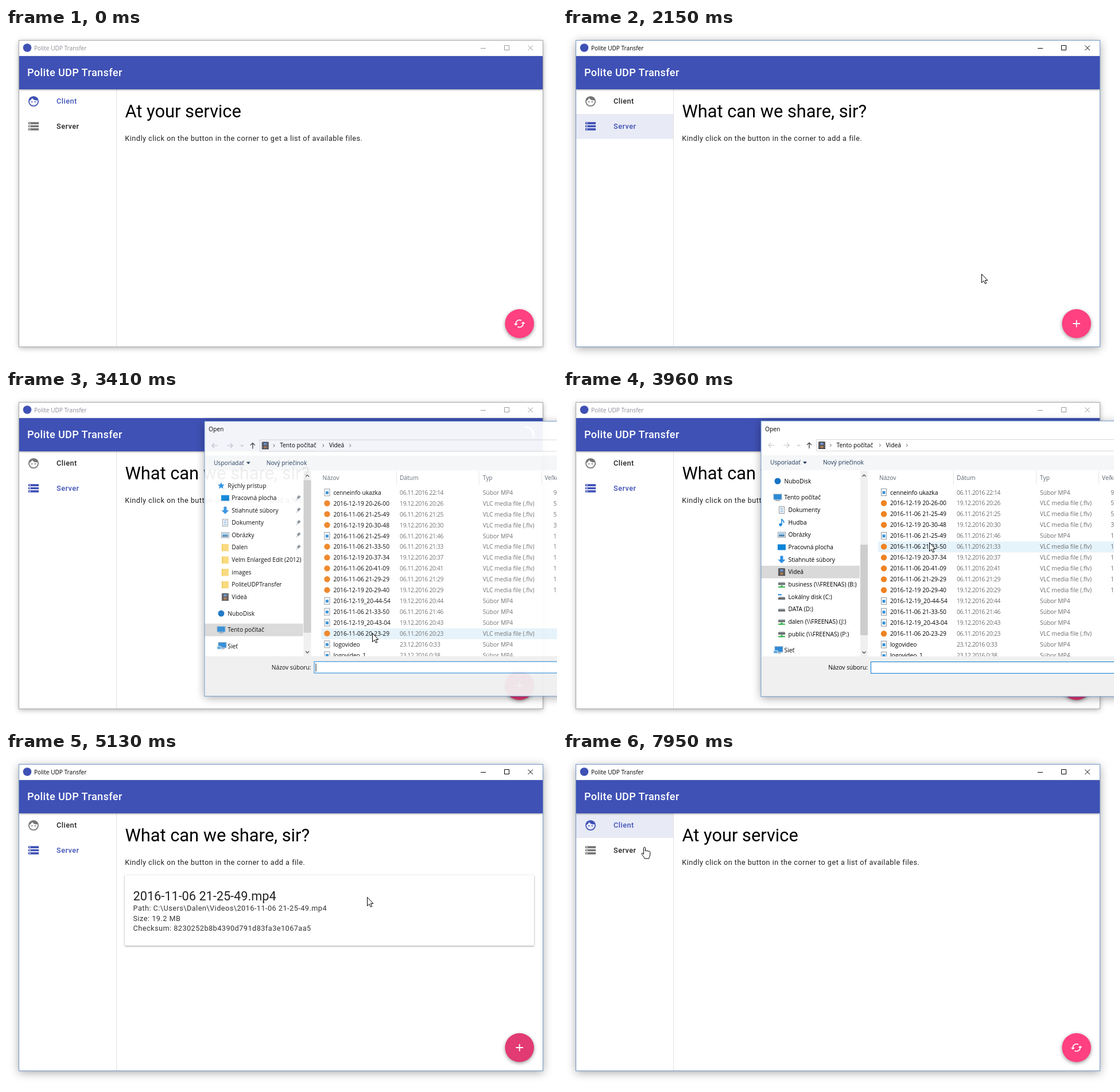
Animation of 960 by 583 pixels, one loop 8000 ms. Source, as an HTML page:

```html
<!DOCTYPE html>
<html lang="en">
<head>
<meta charset="utf-8">
<title>Polite UDP Transfer</title>
<style>
  html, body { margin: 0; width: 100%; height: 100%; overflow: hidden; background: #fff; }
  svg { display: block; width: 960px; height: 583px; }
  text { white-space: pre; }
  .body { font: 12.67px Roboto, sans-serif; letter-spacing: .49px; }
  .nav { font: 500 12.67px Roboto, sans-serif; letter-spacing: .5px; }
  .bar { font: 500 18.1px Roboto, sans-serif; letter-spacing: .38px; }
  .head { font: 30.8px Roboto, sans-serif; }
  .card { font: 21.7px Roboto, sans-serif; }
  .ui { font: 10.25px "Open Sans", sans-serif; }
  .date { font: 10.25px "Open Sans", sans-serif; letter-spacing: -.32px; }
  .shadow { filter: drop-shadow(0 2px 5px rgba(0, 0, 0, .3)); }
  .deep { filter: drop-shadow(0 3px 8px rgba(0, 0, 0, .36)); }
  .low { filter: drop-shadow(0 1px 1.5px rgba(0, 0, 0, .4)); }
  .fab { filter: drop-shadow(0 2px 3px rgba(0, 0, 0, .4)); }
</style>
</head>
<body>
<svg id="stage" viewBox="0 0 960 583"></svg>
<script>
const LOOP = 8000, START = 975, TICK = 78.125;
const BLUE = '#3f51b5', GRAY = '#757575', INK = '#212121';

// Tick numbers of the events
const SERVER = 8, FAB_CLICK = 20, BUSY = 22, OPEN = 28, EXPAND = 33,
      PICK = 48, CLOSE = 48.67, ADDED = 52, CLIENT = 86;

// Pointer path: tick, x, y
const POINTER = [
  [0, 886, 572], [3, 430, 335], [5, 150, 188], [6, 122, 172], [10, 122, 172], [12, 300, 250],
  [15, 729, 429], [17, 880, 508], [18, 893, 516], [23, 893, 516], [28, 638, 424], [32, 638, 424],
  [38, 638, 266], [40, 630, 253], [41, 629, 253], [58, 629, 253], [62, 560, 290], [66, 470, 332],
  [71, 470, 332], [76, 474, 328], [77, 474, 328], [80, 280, 215], [83, 120, 130], [88, 122, 128], [89, 142, 166]
];

const GLYPH = {
  face: 'M9 11.75a1.25 1.25 0 100 2.5 1.25 1.25 0 000-2.5zm6 0a1.25 1.25 0 100 2.5 1.25 1.25 0 000-2.5zM12 2a10 10 0 100 20 10 10 0 000-20zm0 18c-4.4 0-8-3.6-8-8l.05-.86c2.36-1.05 4.23-2.98 5.21-5.37A10 10 0 0019.67 9.74c.21.71.33 1.47.33 2.26 0 4.4-3.6 8-8 8z',
  storage: 'M2 20h20v-4H2zm2-3h2v2H4zM2 4v4h20V4zm4 3H4V5h2zm-4 7h20v-4H2zm2-3h2v2H4z',
  cached: 'M19 8l-4 4h3a6 6 0 01-8.8 5.3l-1.46 1.46A8 8 0 0020 12h3zM6 12a6 6 0 018.8-5.3l1.46-1.46A8 8 0 004 12H1l4 4 4-4z',
  add: 'M19 13h-6v6h-2v-6H5v-2h6V5h2v6h6z'
};

const FILES = [
  'cenneinfo ukazka|06.11.2016 22:14|mp4|98', '2016-12-19 20-26-00|19.12.2016 20:26|flv|56',
  '2016-11-06 21-25-49|06.11.2016 21:25|flv|50', '2016-12-19 20-30-48|19.12.2016 20:30|flv|33',
  '2016-11-06 21-25-49|06.11.2016 21:46|mp4|19', '2016-11-06 21-33-50|06.11.2016 21:33|flv|14',
  '2016-12-19 20-37-34|19.12.2016 20:37|flv|14', '2016-11-06 20-41-09|06.11.2016 20:41|flv|11',
  '2016-11-06 21-29-29|06.11.2016 21:29|flv|11', '2016-12-19 20-29-40|19.12.2016 20:29|flv|10',
  '2016-12-19_20-44-54|19.12.2016 20:44|mp4|9', '2016-11-06 21-33-50|06.11.2016 21:46|mp4|7',
  '2016-12-19_20-43-04|19.12.2016 20:43|mp4|7', '2016-11-06 20-23-29|06.11.2016 20:23|flv|6',
  'logovideo|23.12.2016 0:33|mp4|5', 'logovideo_1|23.12.2016 0:38|mp4|5'
].map(row => row.split('|'));

// Folder trees: icon|label, "*" marks a top level entry, "^" a pinned one
const QUICK = ['*star|Rýchly prístup', '^desk|Pracovná plocha', '^down|Stiahnuté súbory', '^doc|Dokumenty',
  '^pic|Obrázky', '^folder|Dalen', 'folder|Velm Enlarged Edit (2012)', 'folder|images',
  'folder|PoliteUDPTransfer', 'video|Videá', '*cloud|NuboDisk', '*pc|Tento počítač', '*net|Sieť'];
const DRIVES = ['*cloud|NuboDisk', '*pc|Tento počítač', 'doc|Dokumenty', 'note|Hudba', 'pic|Obrázky',
  'desk|Pracovná plocha', 'down|Stiahnuté súbory', 'video|Videá', 'share|business (\\\\FREENAS) (B:)',
  'disk|Lokálny disk (C:)', 'drive|DATA (D:)', 'share|dalen (\\\\FREENAS) (J:)',
  'share|public (\\\\FREENAS) (P:)', '*net|Sieť'];

const clamp = v => Math.max(0, Math.min(1, v));
const rect = (x, y, w, h, fill, more = '') =>
  `<rect x="${x}" y="${y}" width="${w}" height="${h}" fill="${fill}" ${more}/>`;
const path = (d, fill, more = '') => `<path d="${d}" fill="${fill}" ${more}/>`;
const line = (d, color, width = 1) => path(d, 'none', `stroke="${color}" stroke-width="${width}"`);
const dot = (x, y, r, fill, more = '') => `<circle cx="${x}" cy="${y}" r="${r}" fill="${fill}" ${more}/>`;
const text = (x, y, str, cls, fill = '#000', more = '') =>
  `<text x="${x}" y="${y}" class="${cls}" fill="${fill}" ${more}>${str}</text>`;
const at = (x, y, body) => `<g transform="translate(${x} ${y})">${body}</g>`;
const glyph = (name, x, y, fill) =>
  path(GLYPH[name], fill, `transform="translate(${x} ${y}) scale(.905) translate(-12 -12)"`);

const sheet = rect(-4.5, -6, 9, 12, '#fff', 'stroke="#8b949c"');
const hdd = rect(-6, 0, 12, 4, '#6b7074') + rect(-5, -1.5, 10, 1.5, '#c4c8cb');
const monitor = rect(-7, -6, 14, 9.5, '#2b8ad6', 'stroke="#9fb4c6"') + rect(-4, 4.5, 8, 1.5, '#8fa3b3');
const ICON = {
  star: path('M0-6L1.8-2 6-1.6 2.8 1.2 3.8 5.5 0 3.2-3.8 5.5-2.8 1.2-6-1.6-1.8-2z', '#2a8fe0'),
  desk: rect(-7, -5, 14, 10, '#0a84d8'),
  down: path('M-2.5-6.5h5V0h4L0 6.5-6.5 0h4z', '#2f8fe0'),
  doc: sheet + line('M-2.5-3h5M-2.5 0h5M-2.5 3h5', '#4a90c8'),
  pic: rect(-6.5, -4.5, 13, 9, '#fff', 'stroke="#8b949c"') + rect(-5, -3, 10, 3, '#8cc4ee') + rect(-5, 0, 10, 3, '#4a7fa8'),
  folder: rect(-6, -6, 12, 12.5, '#f9d978') + rect(-6, -6, 2, 12.5, '#f3c95a'),
  video: rect(-6, -6.5, 12, 13, '#3d3d42') + rect(-3, -5, 6, 4.5, '#6f8fc0') + rect(-3, .5, 6, 4.5, '#a37a5a') +
    line('M-4.7-6v12M4.7-6v12', '#ccc" stroke-dasharray="1.5 1.5'),
  cloud: dot(0, 0, 5.5, '#1673c4'),
  pc: monitor,
  net: at(2, -1, monitor) + rect(-7, 0, 7, 5, '#5aa7e2', 'stroke="#dce8f2"'),
  note: dot(-2, 4, 2.6, '#1f8ae0') + line('M0 4V-6C1-3 5-3 3.5 1', '#1f8ae0', 1.6),
  drive: hdd,
  share: at(0, -3, hdd) + rect(-6, 3.5, 12, 2, '#35b44a') + rect(-1.5, 1.5, 3, 4, '#35b44a'),
  disk: at(0, 1, hdd) + rect(-6, -5, 2.5, 2.5, '#1f8ae0') + rect(-3, -5, 2.5, 2.5, '#1f8ae0'),
  mp4: sheet + rect(-2.5, -2, 5, 5, '#2f8fd8'),
  flv: dot(0, 0, 5.2, '#ee8322')
};
const icon = (name, x, y) => at(x, y, ICON[name]);

function pointerAt(n) {
  const i = POINTER.findIndex(key => key[0] >= n);
  const [n1, x1, y1] = POINTER[i], [n0, x0, y0] = POINTER[Math.max(0, i - 1)];
  const p = n1 > n0 ? (n - n0) / (n1 - n0) : 1;
  return [x0 + (x1 - x0) * p, y0 + (y1 - y0) * p];
}

function pointer(x, y) {
  const hand = (x < 192 && y > 107 && y < 194) || Math.hypot(x - 894.5, y - 516) < 25;
  const shape = hand
    ? 'M-1.5 1.5C-1.5-.3 1.5-.3 1.5 1.5V7c0-1.5 3-1.5 3 .3 .3-1.3 2.7-1.2 2.8.5 .5-1 2.5-.8 2.5 1V13c0 3-2 4-2 7H0c0-2-4-5.5-5-8.5-.3-1.5 2-1.6 3.5 1z'
    : 'M.5.5V15.6L4 12.4 6.4 17.4 8.7 16.4 6.4 11.5H10.8z';
  return at(x, y, path(shape, '#fff', 'stroke="#000" stroke-linejoin="round"'));
}

function navItem(y, label, name, active, focused) {
  return (focused ? rect(23, y - 21.5, 169, 43.5, '#e8eaf6') : '') +
    glyph(name, 48, y, active ? BLUE : GRAY) + text(88, y + 4, label, 'nav', active ? BLUE : INK);
}

function spinner(n) {
  const a = (-100 + (n - 31) * 37.9) * Math.PI / 180;
  const sweep = (175 - 50 * Math.cos((n - 31) * Math.PI / 19)) * Math.PI / 180;
  const point = t => `${906 + 13 * Math.cos(t)} ${78 + 13 * Math.sin(t)}`;
  return line(`M${point(a)}A13 13 0 ${+(sweep > Math.PI)} 1 ${point(a + sweep)}`, '#fff', 2.7);
}

function appWindow(n) {
  const server = n >= SERVER && n < CLIENT;
  const active = n >= SERVER && (n < OPEN || n > PICK);
  const ink = active ? '#000' : '#999';
  const fab = server && n >= FAB_CLICK ? '#e23a73' : '#ff4081';
  let s = rect(22.5, 21.5, 913, 535, '#fff', `class="${active ? 'deep' : 'shadow'}"`);
  s += rect(192, 107, 1, 449, '#e0e0e0');
  s += navItem(128, 'Client', 'face', !server, n >= CLIENT);
  s += navItem(171.5, 'Server', 'storage', server, server && n < FAB_CLICK);
  s += rect(23, 49, 912, 58, BLUE, 'class="low"');
  s += text(37, 84, 'Polite UDP Transfer', 'bar', '#fff');
  s += dot(37, 34.5, 7.3, BLUE) + text(49, 38.8, 'Polite UDP Transfer', 'ui', active ? '#000' : '#8e8a96', 'style="font-size:10.1px"');
  s += line('M827 35.5h9M868.5 30.5h8v8h-8zM909.5 30.5l8.5 8.5M918 30.5l-8.5 8.5', ink);
  s += text(207.5, 155.5, server ? 'What can we share, sir?' : 'At your service', 'head');
  s += text(207.3, 197, 'Kindly click on the button in the corner to ' +
    (server ? 'add a file.' : 'get a list of available files.'), 'body', INK);
  if (server && n >= ADDED) {
    s += rect(207, 215, 713, 123, '#fff', 'class="low"');
    s += text(221.5, 258.5, '2016-11-06 21-25-49.mp4', 'card', INK);
    ['Path: C:\\Users\\Dalen\\Videos\\2016-11-06 21-25-49.mp4', 'Size: 19.2 MB',
      'Checksum: 8230252b8b4390d791d83fa3e1067aa5']
      .forEach((row, i) => s += text(221.5, 277.3 + i * 17.3, row, 'body', '#333'));
  }
  if (n >= BUSY && n < ADDED) s += spinner(n);
  s += dot(894.7, 516, 25.3, fab, 'class="fab"') + glyph(server ? 'add' : 'cached', 894.7, 516, '#fff');
  return s + rect(22.5, 21.5, 913, 535, 'none', `stroke="${active ? '#7296c8' : '#a6a6a6'}"`);
}

function tree(items, y, selected) {
  return items.map((item, i) => {
    const [, mark, name, label] = item.match(/^([*^]?)(\w+)\|(.*)/);
    const top = mark === '*';
    if (i) y += top ? 28.8 : 21.65;
    return (label === selected ? rect(345, y - 11, 172, 22, '#d9d9d9') : '') +
      icon(name, top ? 374 : 381, y) + text(top ? 385.5 : 392.5, y + 3.6, label, 'ui') +
      (mark === '^' ? line(`M${505} ${y + 4}l3-3`, '#8a939c') + path(`M506 ${y - 1}l4-4 3 3-4 4z`, '#8a939c') : '');
  }).join('');
}

function dialog(n, mouseY) {
  const picked = n >= PICK, expanded = n >= EXPAND;
  const hover = Math.floor((mouseY - 169.5) / 18.98);
  let s = rect(345, 54, 780, 481, '#fff', 'class="deep"');
  s += text(352, 71.5, 'Open', 'ui');
  s += line('M368 96.5h-10M362 92.5l-4 4 4 4M384 96.5h10M390 92.5l4 4-4 4M408 95.5l2.5 2.5 2.5-2.5', '#c8c8c8', 1.2);
  s += line('M429 102v-10M425 96l4-4 4 4', '#555', 1.5);
  s += rect(441.5, 86.5, 640, 20, '#fff', 'stroke="#d9d9d9"') + icon('video', 451, 96.5);
  s += text(476.5, 100, 'Tento počítač', 'ui') + text(562.5, 100, 'Videá', 'ui');
  s += [465, 551, 598].map(x => line(`M${x} 94l2.5 2.5-2.5 2.5`, '#555')).join('');
  s += rect(346, 114, 778, 26, '#f5f6f7');
  s += text(361, 130.2, 'Usporiadať', 'ui', '#1e395b') + path('M418 125h7l-3.5 4z', '#1e395b');
  s += text(453, 130.2, 'Nový priečinok', 'ui', '#1e395b');

  s += expanded ? tree(DRIVES, 159, 'Videá') : tree(QUICK, 166.6, 'Tento počítač');
  s += rect(518, 141, 13, 324, '#f0f0f0') + (expanded ? rect(518, 270, 13, 158, '#cdcdcd') : rect(518, 157, 13, 267, '#cdcdcd'));
  s += line('M521.5 151l3-3 3 3M521.5 456.5l3 3 3-3', '#505050', 1.4);

  [[551, 'Názov'], [686, 'Dátum'], [831, 'Typ'], [939, 'Veľkosť']]
    .forEach(([x, label]) => s += text(x, 156.5, label, 'ui', '#5c6672'));
  s += [680, 824, 933].map(x => rect(x, 141, 1, 24, '#e5e5e5')).join('');
  FILES.forEach(([name, date, type, size], i) => {
    const y = 169.5 + i * 18.98;
    if (picked && i === 4) s += rect(549.5, y + .5, 560, 18, '#cce8ff', 'stroke="#99d1ff"');
    else if (i === hover) s += rect(549, y, 560, 19, '#e5f3fb');
    s += icon(type, 559, y + 9) + text(570, y + 13, name, 'ui') + text(686, y + 13, date, 'date', '#6d6d6d');
    s += text(831, y + 13, type === 'mp4' ? 'Súbor MP4' : 'VLC media file (.flv)', 'ui', '#6d6d6d');
    s += text(966, y + 13, size, 'ui', '#6d6d6d', 'text-anchor="end"');
  });

  s += rect(346, 465, 778, 69.5, '#f0f0f0');
  s += text(531, 488, 'Názov súboru:', 'ui', '#000', 'text-anchor="end"');
  s += rect(536.5, 474.5, 560, 20, '#fff', 'stroke="#0078d7"');
  if (picked) s += text(539.5, 488.5, '2016-11-06 21-25-49', 'ui');
  else if (Math.floor((n - 30) / 6.9) % 2 === 0) s += rect(539, 478, 1, 14, '#000');
  s += rect(345, 54, 780, 481, 'none', 'stroke="#6a93cb"');

  const shown = 1 - (1 - clamp((n - OPEN) / 4)) ** 2 - clamp((n - CLOSE) / 3);
  return `<g opacity="${shown}" transform="translate(735 294.5) scale(${.96 + .04 * shown}) translate(-735 -294.5)">${s}</g>`;
}

function scene(n) {
  const [x, y] = n >= 0 ? pointerAt(n) : [];
  return appWindow(n) +
    (n > OPEN && n < CLOSE + 3 ? dialog(n, y) : '') +
    (n >= 0 ? pointer(x, y) : '');
}

const stage = document.getElementById('stage');
let last;
function frame() {
  const n = Math.max(-1, Math.floor((performance.now() % LOOP - START) / TICK));
  if (n !== last) stage.innerHTML = scene(last = n);
  requestAnimationFrame(frame);
}
frame();
</script>
</body>
</html>
```
